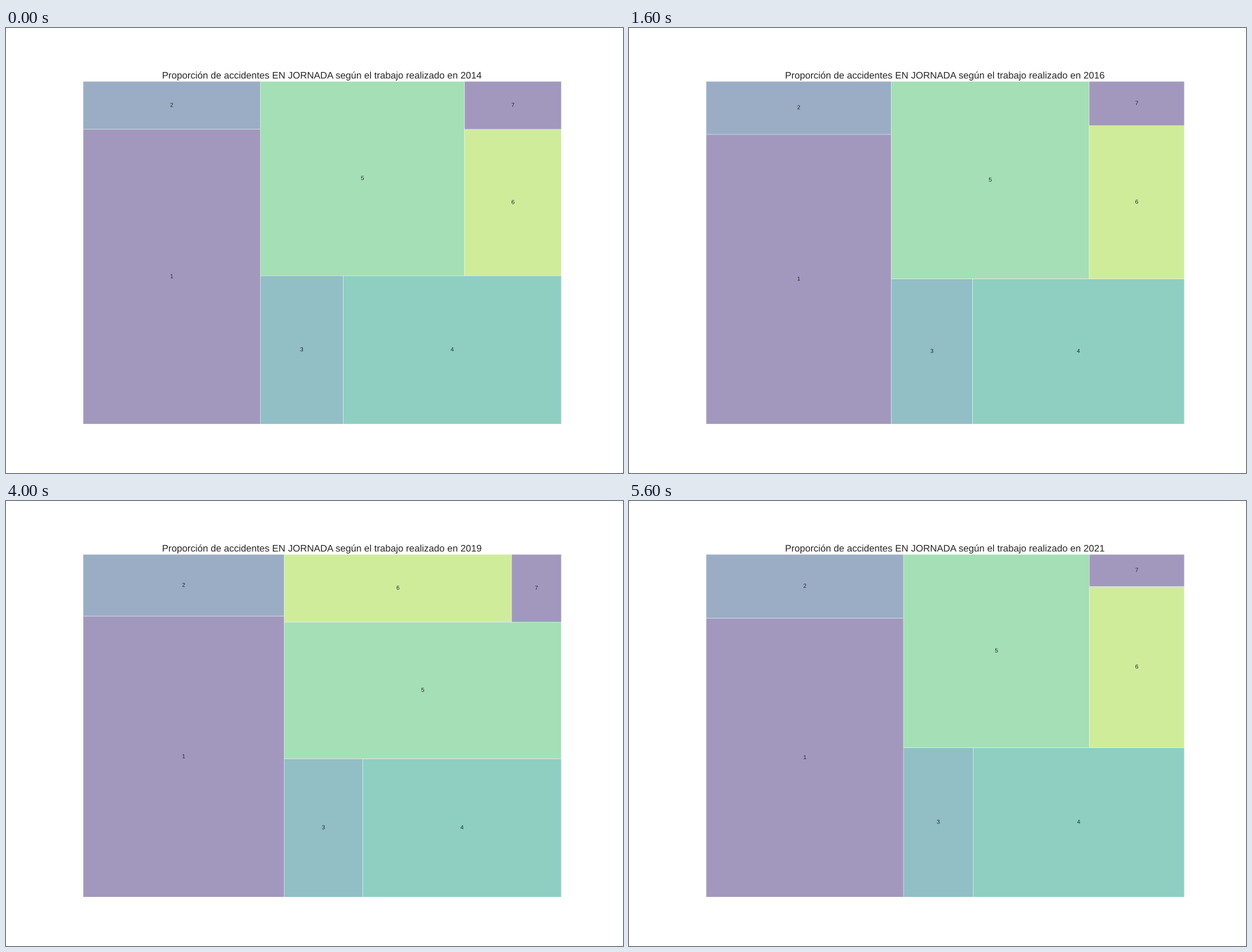
A matplotlib script for the animation above (6400 ms loop, 881 by 636 pixels).

```python
import numpy as np
import matplotlib.pyplot as plt
from matplotlib.animation import FuncAnimation
from matplotlib.patches import Rectangle
from matplotlib.patheffects import Normal

W, H, DPI = 881, 636, 100
SCALE = 0.4894  # 18 x 13 inch layout shrunk to the stage
SIDE = 100      # the treemap fills a square that the axes stretch
FIRST_YEAR = 2014
FRAMES = 8

# Share of each group, in hundredths of a percent, at the turning points.
KEY_FRAMES = [0, 5, 6, 7]
SHARES = [
    [3189, 3446, 3415, 3359],
    [518, 759, 797, 770],
    [749, 663, 707, 634],
    [1976, 1678, 1811, 1927],
    [2421, 2310, 2204, 2190],
    [864, 939, 885, 934],
    [283, 205, 181, 186],
]

plt.rcParams.update({
    "font.family": "Liberation Sans",
    "text.hinting": "none",
    "text.color": ".15",
})


def areas_at(frame):
    """Tile areas; the first long stretch starts slowly."""
    first = KEY_FRAMES[1]
    t = first * (frame / first) ** 1.2 if frame < first else frame
    shares = np.array([np.interp(t, KEY_FRAMES, keys) for keys in SHARES])
    return list(shares / shares.sum() * SIDE ** 2)


def strip(areas, x, y, w, h):
    """Place areas in one strip along the shorter side; return tiles and rest."""
    tiles = []
    if w >= h:
        depth, pos = sum(areas) / h, y
        for area in areas:
            tiles.append((x, pos, depth, area / depth))
            pos += area / depth
        return tiles, (x + depth, y, w - depth, h)
    depth, pos = sum(areas) / w, x
    for area in areas:
        tiles.append((pos, y, area / depth, depth))
        pos += area / depth
    return tiles, (x, y + depth, w, h - depth)


def worst_ratio(areas, space):
    return max(max(w / h, h / w) for _, _, w, h in strip(areas, *space)[0])


def squarify(areas, space):
    """Grow each strip for as long as its tiles get closer to squares."""
    tiles = []
    while areas:
        n = 1
        while (n < len(areas) and worst_ratio(areas[:n + 1], space)
               <= worst_ratio(areas[:n], space)):
            n += 1
        placed, space = strip(areas[:n], *space)
        tiles += placed
        areas = areas[n:]
    return tiles


fig = plt.figure(figsize=(W / DPI, H / DPI), dpi=DPI, facecolor="white")
ax = fig.add_axes([0.125, 0.11, 0.775, 0.77])
ax.set_xlim(0, SIDE)
ax.set_ylim(0, SIDE)
ax.axis("off")

# A path effect draws text as outlines, free of whole-pixel placement.
outline = [Normal()]
title = ax.set_title("", fontsize=20 * SCALE, pad=6 * SCALE,
                     path_effects=outline)

palette = plt.get_cmap("viridis")(np.linspace(0, 1, 8)[1:-1])
boxes, labels = [], []
for i in range(len(SHARES)):
    box = Rectangle((0, 0), 1, 1, facecolor=palette[i % len(palette)],
                    edgecolor="white", linewidth=SCALE, alpha=0.5, snap=False)
    boxes.append(ax.add_patch(box))
    labels.append(ax.text(0, 0, str(i + 1), fontsize=12 * SCALE, ha="center",
                          va="center", path_effects=outline))


def draw(frame):
    title.set_text("Proporción de accidentes EN JORNADA según "
                   f"el trabajo realizado en {FIRST_YEAR + frame}")
    tiles = squarify(areas_at(frame), (0, 0, SIDE, SIDE))
    for box, label, (x, y, w, h) in zip(boxes, labels, tiles):
        box.set_bounds(x, y, w, h)
        label.set_position((x + w / 2, y + h / 2))
    return [title, *boxes, *labels]


anim = FuncAnimation(fig, draw, frames=FRAMES, interval=800, repeat=True,
                     repeat_delay=0, blit=False)
plt.show()
```
